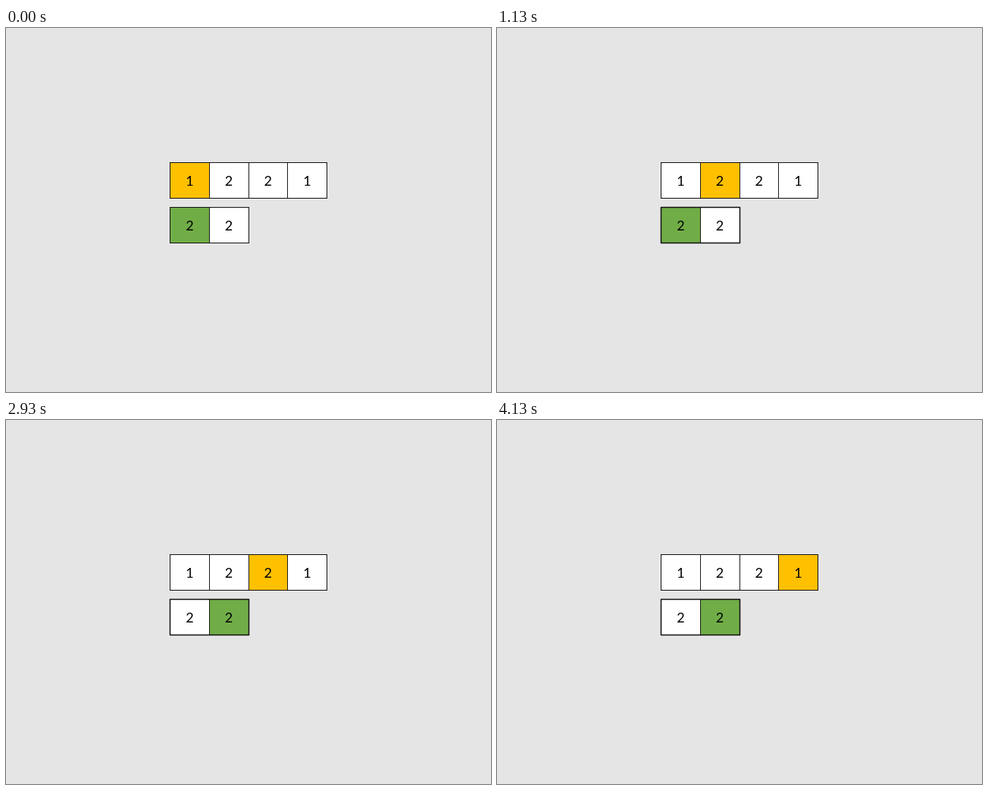
An HTML page that plays this animation: 640x480 px, repeating every 4730 ms.

```html
<!DOCTYPE html>
<html lang="en">
<head>
<meta charset="utf-8">
<title>Array pointers</title>
<style>
html, body { margin: 0; width: 100%; height: 100%; overflow: hidden; background: #e5e5e5; }
svg { display: block; width: 640px; height: 480px; }
text { font: 18px Lato, Carlito, sans-serif; text-anchor: middle; fill: #000; }
</style>
</head>
<body>
<svg id="stage" viewBox="0 0 640 480"></svg>
<script>
const LOOP = 4730, FIRST = 530, STEP = 600;
const EDGES = [216.5, 268.5, 320.5, 371.5, 423.5];
const HEIGHT = 47;
const stage = document.getElementById('stage');

function add(tag, attrs, text = '') {
  const el = document.createElementNS('http://www.w3.org/2000/svg', tag);
  for (const key in attrs) el.setAttribute(key, attrs[key]);
  el.textContent = text;
  stage.append(el);
  return el;
}

function makeRow(values, y, color) {
  const cells = values.map((value, i) => {
    const x = EDGES[i], width = EDGES[i + 1] - x;
    const cell = add('rect', { x, y, width, height: HEIGHT, stroke: '#1a1a1a' });
    add('text', { x: 242.4 + i * 51.7, y: y + 30.6 }, value);
    return cell;
  });
  const frame = add('rect', {
    x: EDGES[0], y, width: EDGES[values.length] - EDGES[0], height: HEIGHT,
    fill: 'none', stroke: '#111', 'stroke-linejoin': 'round'
  });
  const mark = index => cells.forEach((cell, i) =>
    cell.setAttribute('fill', i === index ? color : '#fff'));
  return { mark, frame };
}

const outer = makeRow([1, 2, 2, 1], 177.5, '#ffc000');
const inner = makeRow([2, 2], 236.5, '#70ad47');

function render(ms) {
  const t = ms % LOOP;
  const step = t < FIRST ? 0 : Math.min(7, 1 + Math.floor((t - FIRST) / STEP));
  outer.mark(step >> 1);
  inner.mark(step & 1);
  inner.frame.setAttribute('stroke-width', step ? 1.5 : 1);
}

const start = performance.now();
function tick() {
  render(performance.now() - start);
  requestAnimationFrame(tick);
}
tick();
</script>
</body>
</html>
```
